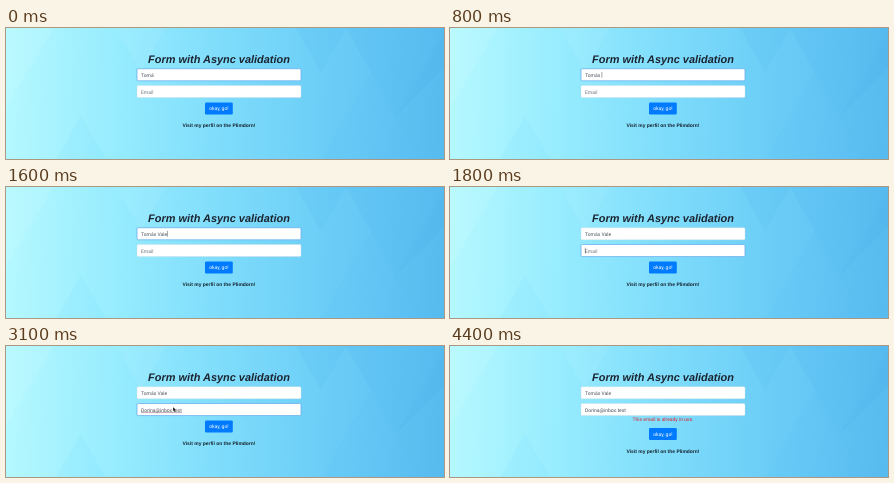
Recreate the animation shown at these times as an HTML page. Size 438 px wide and 131 px high, loop 5.3 s.

```html
<!DOCTYPE html>
<html lang="en">
<head>
<meta charset="utf-8">
<title>Form with Async validation</title>
<style>
  html, body { margin: 0; width: 100%; height: 100%; overflow: hidden; background: #7fdcfb; }
  svg { display: block; width: 438px; height: 131px; }
  text { font: 5px Roboto, "Liberation Sans", sans-serif; white-space: pre; text-rendering: geometricPrecision; }
  .title { font: italic bold 10.95px "Liberation Sans", Arial, sans-serif; fill: #1b2430; }
  .link { font: bold 4.95px "Liberation Sans", Arial, sans-serif; fill: #15212c; }
  .mid { text-anchor: middle; }
  .box { fill: #fff; stroke: #ced4da; stroke-width: .32; }
  .ring { fill: none; stroke: #4ca3f2; stroke-width: .8; stroke-opacity: .75; }
  .value { fill: #495057; }
  .hint { fill: #6c757d; }
  .caret { stroke: #222; stroke-width: .4; }
  .error { fill: #e3202b; font-size: 4.98px; }
</style>
</head>
<body>
<svg viewBox="0 0 438 131">
  <defs>
    <linearGradient id="sky" gradientUnits="userSpaceOnUse" x1="0" y1="60" x2="438" y2="72">
      <stop offset="0" stop-color="#b5f8ff"/>
      <stop offset=".25" stop-color="#97ecfe"/>
      <stop offset=".5" stop-color="#7edcfb"/>
      <stop offset=".75" stop-color="#6accf6"/>
      <stop offset="1" stop-color="#5bbdf0"/>
    </linearGradient>
  </defs>
  <rect width="438" height="131" fill="url(#sky)"/>
  <g id="facets"></g>
  <text class="title mid" x="213" y="35.2">Form with Async validation</text>
  <g id="fields"></g>
  <text id="error" class="error mid" x="213" y="75">This email is already in use.</text>
  <g id="footer">
    <rect x="199" y="74.6" width="27.8" height="11.9" rx="1.25" fill="#007bff"/>
    <text class="mid" x="212.9" y="82.2" fill="#fff">okay, go!</text>
    <text class="link mid" x="213" y="99.3">Visit my perfil on the Plimdorn!</text>
  </g>
  <path id="mouse" d="M0 0V4.6L1.1 3.6L1.9 5.3L2.7 4.9L1.9 3.3H3.3Z" fill="#111" stroke="#fff" stroke-width=".25"/>
</svg>
<script>
const LOOP = 5300, STEP = 100;
const NAME = 'Tomás Vale', EMAIL = 'Dorina@inbox.test';
const $ = id => document.getElementById(id);
const clamp = v => Math.max(0, Math.min(1, v));

function add(parent, tag, attrs, text = '') {
  const el = document.createElementNS('http://www.w3.org/2000/svg', tag);
  for (const key in attrs) el.setAttribute(key, attrs[key]);
  el.textContent = text;
  return parent.appendChild(el);
}
const show = (el, on) => el.setAttribute('opacity', +on);

// Faint background triangles: points, colour, opacity
[
  ['0,0 48,0 0,80', '#fff', .07],
  ['75,88 100,131 50,131', '#4ccdf5', .08],
  ['110,0 160,0 135,44', '#fff', .05],
  ['290,0 340,0 315,44', '#2f9fe0', .07],
  ['365,44 415,131 315,131', '#2f9fe0', .05],
  ['340,0 438,0 438,40 390,88', '#2c98dc', .08],
  ['390,88 438,5 438,131 415,131', '#2c98dc', .06]
].forEach(([points, fill, opacity]) => add($('facets'), 'polygon', { points, fill, opacity }));

function makeField(y, hint) {
  const g = add($('fields'), 'g', {});
  const rect = { x: 131, y, width: 164, height: 12.1, rx: 1.25 };
  add(g, 'rect', { ...rect, class: 'box' });
  const ring = add(g, 'rect', { ...rect, class: 'ring' });
  const label = add(g, 'text', { x: 135, y: y + 8, class: 'hint' }, hint);
  const value = add(g, 'text', { x: 135, y: y + 8, class: 'value' });
  const squiggle = add(g, 'path', { stroke: '#8a5560', 'stroke-width': .5 });
  const caret = add(g, 'path', { class: 'caret' });
  return (text, focus, blink, misspelt) => {
    value.textContent = text;
    const width = text ? value.getComputedTextLength() : 0;
    show(label, !text);
    show(ring, focus);
    show(caret, blink);
    caret.setAttribute('d', `M${135.3 + width} ${y + 3.2}v5.8`);
    show(squiggle, misspelt);
    squiggle.setAttribute('d', `M135 ${y + 9.1}h${width}`);
  };
}
const drawName = makeField(40.7, 'Name');
const drawEmail = makeField(57.5, 'Email');

// [time, letters typed]
const nameKeys = [[0, 4], [500, 5], [700, 6], [1000, 7], [1100, 8], [1300, 9], [1500, 10]];
// [time, x, y]
const mousePath = [[3100, 167, 61], [3200, 166.6, 71], [3300, 165.6, 91], [3400, 165, 103]];
const latest = (table, t) => table.filter(row => row[0] <= t).pop();

function render(time) {
  const t = Math.floor(time / STEP) * STEP;
  const toEmail = clamp((t - 1650) / 150);
  const blur = clamp((t - 3350) / 150);
  const typed = Math.round(EMAIL.length * clamp((t - 1800) / 1100));
  const failed = t >= 3600;

  drawName(NAME.slice(0, latest(nameKeys, t)[1]), 1 - toEmail, t >= 100 && t < 1700, false);
  drawEmail(EMAIL.slice(0, typed), toEmail * (1 - blur), t >= 1700 && t < 3100, t >= 2900 && t < 3400);

  show($('error'), failed);
  $('footer').setAttribute('transform', `translate(0 ${failed ? 7.5 : 0})`);

  const [, x, y] = latest(mousePath, t) || mousePath[0];
  show($('mouse'), t >= 3100 && t < 4300);
  $('mouse').setAttribute('transform', `translate(${x} ${y})`);
}

const start = performance.now();
function tick() {
  render((performance.now() - start) % LOOP);
  requestAnimationFrame(tick);
}
tick();
</script>
</body>
</html>
```
